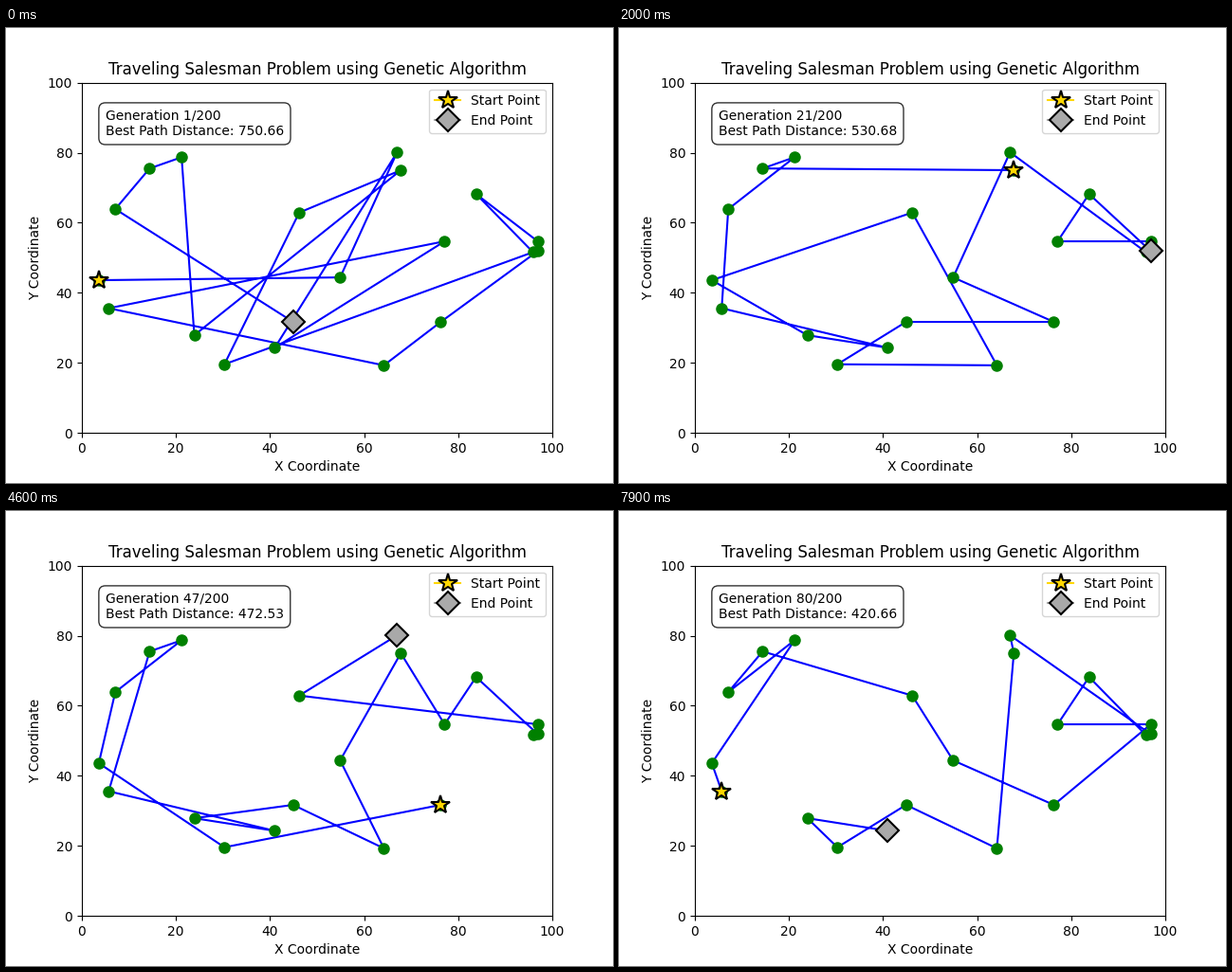
A matplotlib script that plays this animation: 640x480 px, repeating every 8 s.

```python
import numpy as np
import matplotlib.pyplot as plt
from matplotlib.animation import FuncAnimation

FRAMES, INTERVAL, GENERATIONS = 80, 100, 200

CITIES = dict(
    A=(3.6, 43.6), B=(5.7, 35.6), C=(7.1, 63.9), D=(14.4, 75.5),
    E=(21.2, 78.7), F=(23.9, 27.9), G=(30.3, 19.6), H=(41.0, 24.3),
    I=(44.9, 31.7), J=(46.2, 62.9), K=(54.9, 44.4), L=(64.2, 19.3),
    M=(67.0, 80.1), N=(67.8, 75.0), O=(76.3, 31.7), P=(77.1, 54.7),
    Q=(83.8, 68.2), R=(95.9, 51.6), S=(96.9, 54.7), T=(96.9, 51.9),
)

# generation at which a tour becomes the best, its order, its known length
TOURS = [
    (1, "AKMHPBLOTSQRGJNFEDCI", 750.66),
    (4, "ICDEFNJGAKMHPBLOQRST", None),
    (7, "ICDEFGJNMKAHPBLOQRST", None),
    (10, "KOJLECDAHIBFGNMTSPQR", None),
    (13, "GPSQRTMNFIHBACEDLJOK", 543.65),
    (20, "NDECBHFAJLGIOKMRSPQT", 530.68),
    (23, "KOSQTRPJMNGFIBHACEDL", None),
    (28, "KLOSQTRPJMNGFIBHCAED", 493.59),
    (34, "KLOSQTRPJMNGFIBHAECD", None),
    (43, "OGACEDBHFILKNPQTRSJM", 472.53),
    (51, "BAECDJKOSQPRTMNLGIFH", None),
    (58, "BAECDJKOSPQRTMNLIGFH", 420.66),
]


def tour_points(order):
    return np.array([CITIES[c] for c in order])


def tour_length(points):
    return np.hypot(*np.diff(points, axis=0).T).sum()


fig, ax = plt.subplots(figsize=(6.4, 4.8), dpi=100)
ax.set(xlim=(0, 100), ylim=(0, 100),
       xlabel="X Coordinate", ylabel="Y Coordinate",
       title="Traveling Salesman Problem using Genetic Algorithm")

path, = ax.plot([], [], "b-")
ax.plot(*tour_points(CITIES).T, "o", color="green", markersize=8)


def end_marker(shape, color, size, label):
    return ax.plot([], [], marker=shape, color=color, markersize=size,
                   markeredgecolor="black", markeredgewidth=1.5,
                   label=label)[0]


start = end_marker("*", "gold", 15, "Start Point")
end = end_marker("D", "darkgray", 12, "End Point")
ax.legend(loc="upper right")
info = ax.text(5, 85, "", fontsize=10,
               bbox=dict(facecolor="white", alpha=0.8,
                         boxstyle="round,pad=0.5"))


def update(i):
    gen = i + 1
    _, order, length = [t for t in TOURS if t[0] <= gen][-1]
    points = tour_points(order)
    if length is None:
        length = tour_length(points)
    path.set_data(*points.T)
    start.set_data(*points[:1].T)
    end.set_data(*points[-1:].T)
    info.set_text(f"Generation {gen}/{GENERATIONS}\n"
                  f"Best Path Distance: {length:.2f}")
    return path, start, end, info


anim = FuncAnimation(fig, update, frames=FRAMES, interval=INTERVAL,
                     repeat=True, repeat_delay=0)
plt.show()
```
